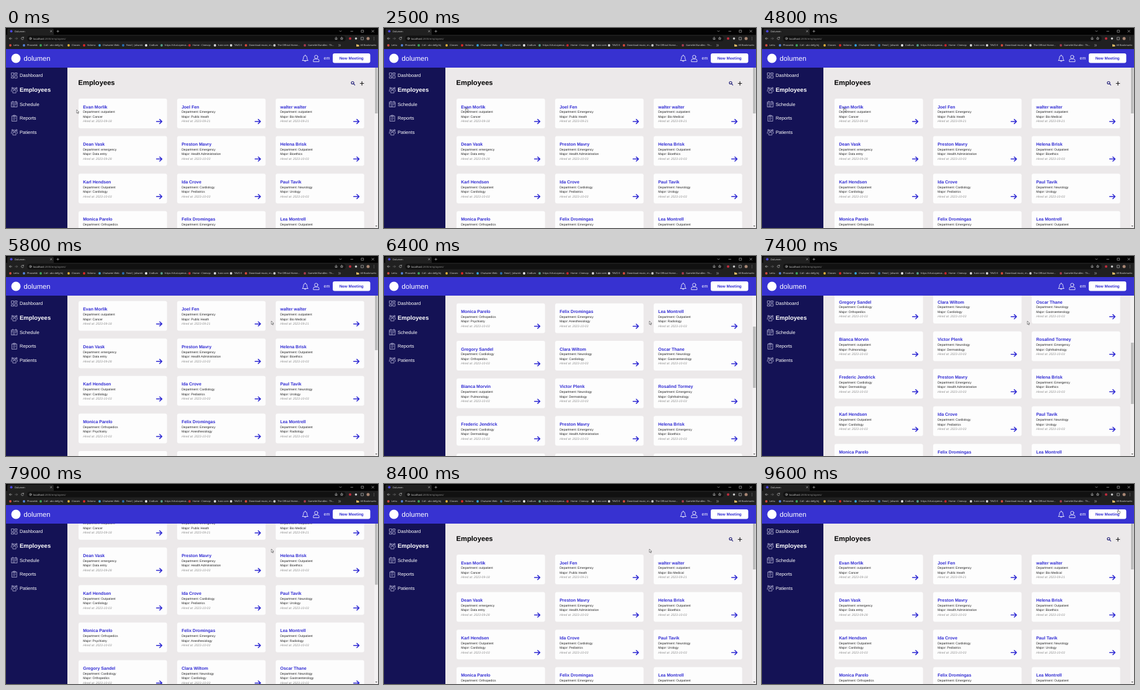
Animation, 600 px wide and 323 px high, one loop 9700 ms. Source, as an HTML page:

```html
<!DOCTYPE html>
<html lang="en">
<head>
<meta charset="utf-8">
<title>Employees</title>
<style>
  html, body { margin: 0; width: 100%; height: 100%; overflow: hidden; background: #000; }
  svg { display: block; width: 600px; height: 323px; font-family: "Liberation Sans", Arial, sans-serif; text-rendering: geometricPrecision; }
  .browser { font: 3.9px "Open Sans", sans-serif; fill: #dedede; }
  .line { fill: none; stroke-linecap: round; stroke-linejoin: round; }
  .nav { font-size: 7.6px; fill: #fff; }
  .name { font-size: 7px; font-weight: bold; fill: #302bd3; }
  .info { font-size: 5.05px; fill: #222; }
  .hired { font-size: 5.05px; font-style: italic; fill: #8c8c8c; }
</style>
</head>
<body>
<svg viewBox="0 0 600 323">
  <defs>
    <clipPath id="view"><rect x="99" y="64" width="495" height="259"/></clipPath>
    <g id="people" class="line">
      <circle cx="5" cy="3.2" r="1.5"/><circle cx="1.8" cy="2" r="1.1"/><circle cx="8.2" cy="2" r="1.1"/>
      <path d="M2.4 9.5V7q0-1.7 2.6-1.7T7.6 7v2.5zM.3 7.5V5q0-1.2 1.6-1.2M9.7 7.5V5q0-1.2-1.6-1.2"/>
    </g>
  </defs>

  <rect x="99" y="64" width="501" height="259" fill="#ece9ea"/>
  <g clip-path="url(#view)">
    <g id="page">
      <text x="116.5" y="91.5" font-size="11.2" font-weight="bold">Employees</text>
      <g class="line" stroke="#222" stroke-width="1.2">
        <circle cx="559" cy="88.5" r="2" stroke="#25237a"/>
        <path d="M560.6 90.2l2 2" stroke="#25237a"/>
        <path d="M571.3 89.5h5.6M574.1 86.7v5.6"/>
      </g>
      <g id="cards"></g>
    </g>
  </g>

  <rect x="594" y="34" width="6" height="289" fill="#f3f1f2"/>
  <path d="M595.5 37.5l1.7-2 1.7 2zM595.5 319l1.7 2 1.7-2z" fill="#666"/>
  <rect id="thumb" x="595" y="39" width="4.5" height="99" fill="#bdbdbd"/>

  <rect y="64" width="99" height="259" fill="#141255"/>
  <g class="nav">
    <text x="22" y="79.3">Dashboard</text>
    <text x="22" y="103.2" font-size="9.5" font-weight="bold">Employees</text>
    <text x="22" y="125.5">Schedule</text>
    <text x="22" y="148">Reports</text>
    <text x="22" y="170.5">Patients</text>
  </g>
  <g class="line" stroke="#c9c8e6" stroke-width=".7">
    <path d="M9 72.5h3.5v4H9zM14.5 72.5H18v2.5h-3.5zM9 78.5h3.5V81H9zM14.5 77H18v4h-3.5z"/>
    <use href="#people" x="8.5" y="95"/>
    <path d="M9 119.5h9v8H9zM9 122h9M11 118v2M16 118v2M11 124h1M13 124h1M15 124h1M11 126h1M13 126h1"/>
    <path d="M9.8 142h7.5v8.5H9.8zM12 141h3v2h-3zM11.5 145.5h4M11.5 148h3"/>
    <use href="#people" x="8.5" y="163"/>
  </g>

  <rect y="34" width="600" height="30" fill="#3732d1"/>
  <circle cx="16" cy="49" r="7.5" fill="#fff"/>
  <text x="28.5" y="52.8" font-size="11.2" fill="#fff">dolumen</text>
  <g class="line" stroke="#fff" stroke-width=".8">
    <path d="M478.3 52.3q1.4-1 1.4-4.2 0-3.5 2.9-3.5t2.9 3.5q0 3.2 1.4 4.2zM481.3 53.5q1.3 1.5 2.6 0M482.6 43.5v1"/>
    <circle cx="500.3" cy="46.7" r="2.7"/>
    <path d="M495.7 54v-1.5q0-2.5 2.5-2.5h4.2q2.5 0 2.5 2.5V54z"/>
  </g>
  <text x="512.5" y="51.3" font-size="7" fill="#fff">em</text>
  <rect x="527" y="41" width="60.5" height="15.5" rx="3" fill="#fff"/>
  <text x="557.2" y="51.3" font-size="6.4" font-weight="bold" fill="#302bd3" text-anchor="middle">New Meeting</text>

  <g class="browser">
    <rect width="600" height="34" fill="#202020"/>
    <rect width="600" height="11" fill="#030303"/>
    <path d="M2 11V3q0-2 2-2h71q2 0 2 2v8z" fill="#202020"/>
    <circle cx="8.5" cy="5.3" r="2" fill="#4b46df"/>
    <text x="14" y="6.8">Dolumen</text>
    <rect x="34" y="12.5" width="514" height="9" rx="4.5" fill="#111"/>
    <text x="44" y="18.6" font-size="4.2">localhost:<tspan fill="#929292">2000/employees/</tspan></text>
    <g class="line" stroke="#c8c8c8" stroke-width=".6">
      <path d="M71.5 4l2.5 2.5M74 4l-2.5 2.5M82 5.3h3.4M83.7 3.6V7"/>
      <path d="M538 4.5l1.5 1.5 1.5-1.5M556 5.3h3.5M573.3 3.5h3.4v3.4h-3.4zM590 3.5l3.4 3.4M593.4 3.5L590 6.9"/>
      <path d="M9.5 17H5.5l1.7-1.7M5.5 17l1.7 1.7"/>
      <path d="M14.5 17h4l-1.7-1.7M18.5 17l-1.7 1.7" stroke="#777"/>
      <path d="M28.2 15.7a2 2 0 1 0 .2 2M28.4 14.5v1.4H27"/>
      <circle cx="39.5" cy="17" r="1.7"/><path d="M39.5 16.8v1"/>
      <path d="M531 16v2.5h3V16M532.5 17.5v-3M541.5 14.8l.6 1.5 1.6.1-1.2 1 .4 1.5-1.4-.8-1.4.8.4-1.5-1.2-1 1.6-.1zM573 15h3.4v4H573zM593.5 15v.1M593.5 17v.1M593.5 19v.1"/>
      <path d="M536.5 26.5l1.3 1.5-1.3 1.5M538.5 26.5l1.3 1.5-1.3 1.5"/>
    </g>
    <circle cx="555" cy="17" r="2" fill="#c22d3d"/>
    <circle cx="564.5" cy="17" r="1.8" fill="#ccc"/>
    <circle cx="584" cy="17" r="2.5" fill="#a78673"/>
    <path d="M565 26.3h1.5l.6.7h2.3v3H565z" fill="#d8b665"/>
    <text x="571.5" y="29.3">All Bookmarks</text>
    <g id="bookmarks"></g>
  </g>

  <g id="cursor" stroke="#222" stroke-width=".5" stroke-linejoin="round">
    <path id="arrow" fill="#fff" d="M0 0v5.5l1.3-1.2.9 2 .9-.4-.9-1.9H4z"/>
    <path id="hand" fill="#fff" d="M1 .5q.6-.5 1 0v2.3l2.3.6q.7.3.5 1L4.3 6.5H1.8L-.2 4q0-.8 1.2 0z"/>
  </g>
</svg>
<script>
const LOOP = 9700, FRAME = 100, PITCH = 60.6;
const $ = id => document.getElementById(id);
const shift = (x, y) => `matrix(1 0 0 1 ${x} ${y})`;

const bookmarks = [
  [5, "#d84b40", "Lettu"], [27, "#5585df", "Phrasebk"], [54, "#3da55d", "Call - abc-defg-hij"],
  [99, "#e0b03c", "Classes"], [124, "#e02828", "Vidorra"], [149, "#35a3dc", "Chatwren Web"],
  [187, "#2971b8", "Feed | Jobwick"], [224, "#eee", "Codlum"], [249, "#57a18c", "https://chat.openai..."],
  [294, "#c9262e", "Home - Cinevop"], [335, "#ddd", "haisi.com"], [361, "#ddd", "TAVO E"],
  [385, "#d94b3d", "Download music, m..."], [431, "#ccc", "The Official Home..."], [480, "#a93c50", "Gamelet Bundles - Th..."]
];

const staff = [
  "Evan Morlik|outpatient|Cancer|09-18", "Joel Fen|Emergency|Public Heath|09-21",
  "walter walter|outpatient|Bio Medical|09-21", "Dean Vask|emergency|Data entry|09-28",
  "Preston Mavry|Emergency|Health Administration", "Helena Brisk|Outpatient|Bioethics",
  "Karl Hendsen|Outpatient|Cardiology", "Ida Crove|Cardiology|Pediatrics",
  "Paul Tavik|Neurology|Urology", "Monica Parelo|Orthopedics|Psychiatry",
  "Felix Dromingas|Emergency|Anesthesiology", "Lea Montrell|Outpatient|Radiology",
  "Gregory Sandel|Cardiology|Orthopedics", "Clara Wiltom|Neurology|Cardiology",
  "Oscar Thane|Neurology|Gastroenterology", "Bianca Morvin|outpatient|Pulmonology",
  "Victor Plenk|Neurology|Dermatology", "Rosalind Tormey|Emergency|Ophthalmology",
  "Frederic Jendrick|Cardiology|Dermatology"
].map(entry => entry.split("|"));

// After the first full list, the staff repeat from the fifth person on.
function card(i) {
  const [name, dept, major, date = "10-03"] = staff[i < 19 ? i : 4 + (i - 19) % 15];
  const x = 117 + i % 3 * 159, y = 114 + Math.floor(i / 3) * PITCH;
  return `<g transform="${shift(x, y)}">
    <rect width="142.7" height="48" rx="3" fill="#fdfdfd"/>
    <text class="name" x="7.2" y="15.5">${name}</text>
    <text class="info" x="7.2" y="23.4">Department: ${i === 20 ? "Emergency" : dept}</text>
    <text class="info" x="7.2" y="30.9">Major: ${major}</text>
    <text class="hired" x="7.2" y="38.4">Hired at: 2023-${date}</text>
    <path class="line" stroke="#302bd3" stroke-width="1.5" d="M125.7 37h8.8m-3.6-3.4l3.6 3.4-3.6 3.4"/>
  </g>`;
}

$("cards").innerHTML = Array.from({ length: 39 }, (_, i) => card(i)).join("");
$("bookmarks").innerHTML = bookmarks.map(([x, color, label]) =>
  `<circle cx="${x + 2}" cy="28" r="1.9" fill="${color}"/><text x="${x + 7}" y="29.3">${label}</text>`).join("");

// Keys are [time, ...values], joined by straight segments.
const scrollKeys = [[0, 0], [5600, 0], [5900, 62], [6400, 219.3], [6900, 376.6], [7100, 400],
  [7300, 340], [7900, 72], [8200, 0], [LOOP, 0]];
const cursorKeys = [[0, 114, 132], [500, 131, 128], [4800, 131, 128], [5400, 428, 105],
  [8500, 428, 105], [9300, 573, 41], [LOOP, 573, 41]];

function sample(keys, t) {
  const next = keys.findIndex(key => key[0] > t);
  const a = keys[next - 1], b = keys[next], k = (t - a[0]) / (b[0] - a[0]);
  return a.slice(1).map((v, i) => v + (b[i + 1] - v) * k);
}

function draw(now) {
  const t = Math.floor(now % LOOP / FRAME) * FRAME;
  const [scroll] = sample(scrollKeys, t), [x, y] = sample(cursorKeys, t);
  const pointing = (t >= 300 && t < 4900) || t >= 9200;
  $("page").setAttribute("transform", shift(0, -scroll));
  $("thumb").setAttribute("y", 39 + scroll * 0.342);
  $("cursor").setAttribute("transform", shift(x, y));
  $("hand").style.display = pointing ? "" : "none";
  $("arrow").style.display = pointing ? "none" : "";
  requestAnimationFrame(draw);
}
draw(0);
</script>
</body>
</html>
```
